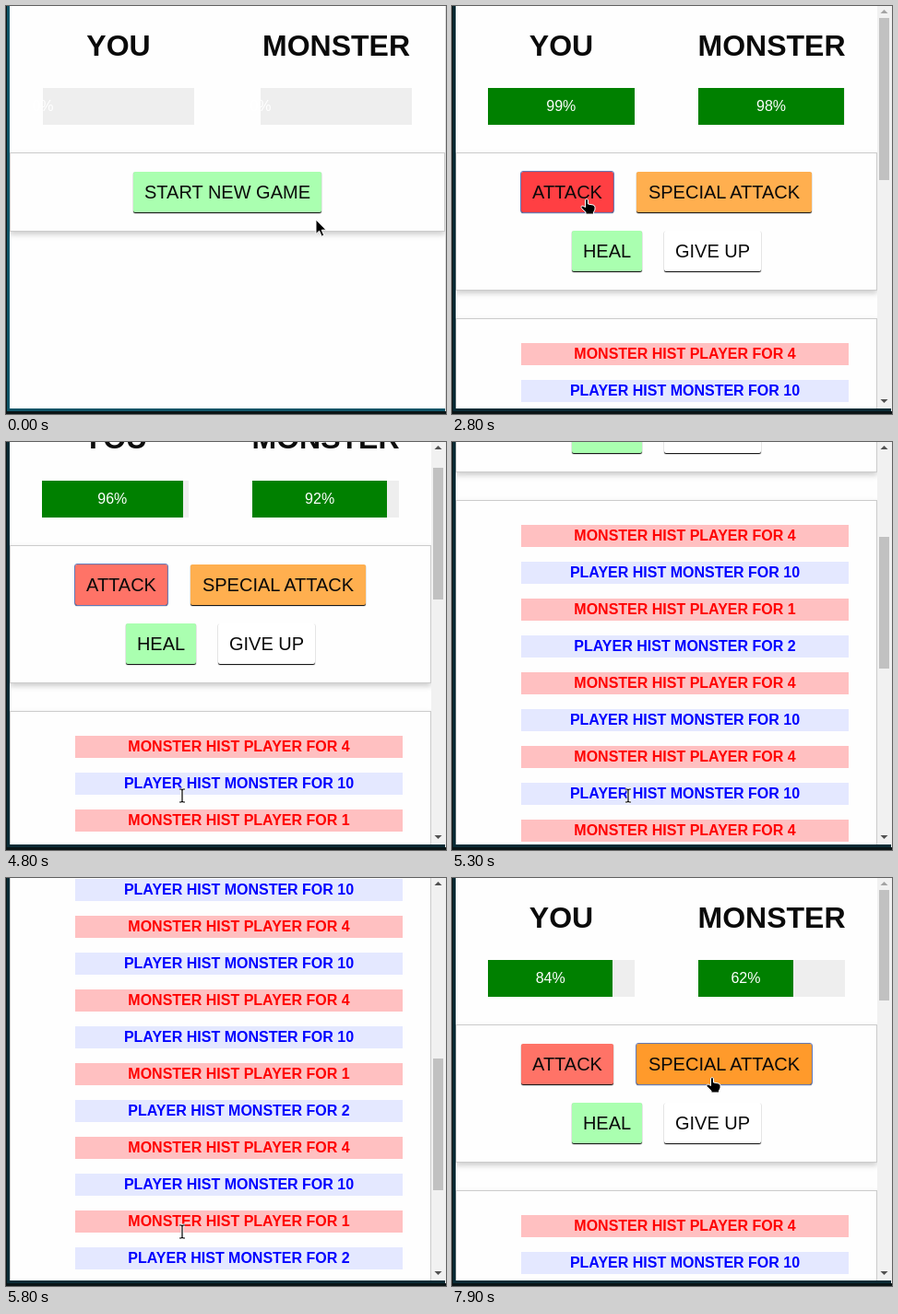
Write an HTML page that moves like this. It is 477 px wide and 443 px high and loops after 8 s.

```html
<!DOCTYPE html>
<html lang="en">
<head>
<meta charset="utf-8">
<title>Monster fight</title>
<style>
html, body { margin: 0; width: 100%; height: 100%; overflow: hidden; }
body { position: relative; background: #0a1416; color: #0a0a0a; font: 16px "Liberation Sans", Arial, sans-serif; }
div, h1, button, svg { position: absolute; box-sizing: border-box; margin: 0; white-space: nowrap; text-align: center; }
#frame { left: 1px; top: 0; width: 476px; height: 440px; background: #0f5568; border-right: 1px solid #ddd; }
.run #frame { background: #0a2c36; border-color: #eee; }
#view { left: 0; top: 0; width: 477px; height: 443px; background: #fefefe; clip-path: inset(0 1px 6px 4px); }
#doc { left: 0; top: 0; width: 477px; height: 0; }

.side { left: 4px; top: 0; width: 236px; height: 130px; }
.side + .side { left: 240px; }
.run .side { width: 229px; }
.run .side + .side { left: 232px; }
h1 { top: 23px; width: 100%; font-size: 32px; line-height: 40px; }
.bar { left: 36px; top: 89px; width: 164px; height: 40px; background: #eee; }
.run .bar { left: 35px; width: 159px; }
.fill { left: 0; top: 0; height: 100%; display: flex; justify-content: center; background: green; color: #fff; line-height: 40px; }
.fill span { flex: none; }

.panel { left: 4px; width: 472px; border: 1px solid #ccc; box-shadow: 0 3px 6px #ccc; }
.run .panel { width: 457px; }
#controls { top: 159px; height: 86px; }
.run #controls { height: 150px; }
#log { top: 339px; }
.row { left: 70px; width: 355px; height: 24px; line-height: 24px; font-weight: bold; color: red; background: #ffc0c1; }
.row.player { color: blue; background: #e4e8ff; }
button { height: 44px; padding: 0; border: 0; border-radius: 2px; font: 20px/44px "Liberation Sans", Arial, sans-serif; color: #0a0a0a; box-shadow: 0 1px 1px #000; }
button.focus { outline: 1px solid #6179b8; }

#scroll { left: 461px; top: 0; width: 15px; height: 437px; background: #f1f1f1; }
#thumb { left: 2px; width: 11px; background: #c1c1c1; }
#scroll svg { left: 0; top: 0; }
#pointer { left: 0; top: 0; overflow: visible; }
</style>
</head>
<body>
<div id="frame"></div>
<div id="view">
  <div id="doc">
    <div class="side"><h1>YOU</h1><div class="bar"><div class="fill"><span></span></div></div></div>
    <div class="side"><h1>MONSTER</h1><div class="bar"><div class="fill"><span></span></div></div></div>
    <div id="controls" class="panel"></div>
    <div id="log" class="panel"></div>
  </div>
  <div id="scroll">
    <div id="thumb"></div>
    <svg width="15" height="437"><path id="up" d="M3.5 8L7.5 4L11.5 8Z"/><path d="M3.5 427L7.5 431L11.5 427Z" fill="#505050"/></svg>
  </div>
</div>
<svg id="pointer" width="1" height="1">
  <path id="arrow" d="M0 0V15.5L3.6 12.2L6.2 18.2L8.8 17L6.2 11.2H11Z" stroke="#fff" stroke-width="1"/>
  <path id="hand" d="M-1.5 0.5Q0 -1.5 1.5 0.5V5L7 6Q9 6.500 9 8.500V11L7.500 14V16H-1V14L-5.500 9.500Q-7 7 -4 7L-1.500 8.500Z" stroke="#fff" stroke-width="1"/>
  <g id="beam" fill="none">
    <path d="M-3 -7H-1L0 -6L1 -7H3M0 -6V6M-3 7H-1L0 6L1 7H3" stroke="#fff" stroke-width="3"/>
    <path d="M-3 -7H-1L0 -6L1 -7H3M0 -6V6M-3 7H-1L0 6L1 7H3" stroke="#000" stroke-width="1.200"/>
  </g>
</svg>
<script>
const $ = id => document.getElementById(id);
const LOOP = 8000, STEP = 100, START = 500, TRACK = 409, VIEW = 439;

// Monster damage per round: earlier rounds, then the ones played here
const oldRounds = '4144414', newRounds = '1111444';
const clicks = [2800, 3000, 3800, 3800, 7200, 7400, 7800];
const playerHit = hit => hit > 1 ? 10 : 2;

// Keyframes: [time, value]
const grow = [[400, 0], [1000, 100]];
const loss = [[2700, 0], [2800, .3], [2900, .3], [3300, 2], [3700, 2], [3800, 2.9], [3900, 2.9],
  [4000, 4], [7100, 4], [7600, 12], [7700, 12], [7800, 13], [7900, 14.9]];
const scrollY = [[4700, 0], [4800, 47], [5300, 276], [5600, 815], [5700, 740], [5800, 565], [6200, 0]];
const mouseX = [[0, 336], [200, 310], [800, 310], [1300, 146], [3900, 146], [4500, 191], [6600, 191], [6700, 279], [7000, 279], [7100, 282]];
const mouseY = [[0, 232], [200, 208], [800, 208], [1300, 210], [3900, 210], [4500, 384], [6600, 384], [6700, 226], [7000, 226], [7100, 217]];

function at(keys, t) {
  const i = keys.findIndex(k => k[0] > t);
  if (i < 0) return keys[keys.length - 1][1];
  if (i === 0) return keys[0][1];
  const [t0, a] = keys[i - 1], [t1, b] = keys[i];
  return a + (b - a) * (t - t0) / (t1 - t0);
}

function add(parent, tag, text, className = '') {
  const el = document.createElement(tag);
  el.textContent = text;
  el.className = className;
  return parent.appendChild(el);
}

const buttons = [
  ['START NEW GAME', 138, 180, 204, '#aaffb0', '#76ff7e'],
  ['ATTACK', 75, 180, 100, '#ff7367', '#ff3f43'],
  ['SPECIAL ATTACK', 200, 180, 190, '#ffaf4f', '#ff9a2b'],
  ['HEAL', 130, 244, 76, '#aaffb0', '#76ff7e'],
  ['GIVE UP', 230, 244, 105, '#ffffff', '#c7c7c7']
].map(([text, x, y, w, color, hover]) => {
  const el = add($('doc'), 'button', text);
  Object.assign(el.style, { left: x + 'px', top: y + 'px', width: w + 'px' });
  return { el, x, y, w, color, hover };
});

const rows = [...oldRounds + newRounds].flatMap(hit => [
  add($('log'), 'div', 'MONSTER HIST PLAYER FOR ' + hit, 'row'),
  add($('log'), 'div', 'PLAYER HIST MONSTER FOR ' + playerHit(hit), 'row player')
]);
rows.forEach((row, i) => row.style.top = 26 + 40 * i + 'px');

const fills = document.querySelectorAll('.fill');
function setBar(i, width, label) {
  fills[i].style.width = width + '%';
  fills[i].firstChild.textContent = label + '%';
}

function show(el, on) { el.style.display = on ? '' : 'none'; }

function draw(now) {
  const t = Math.floor(now % LOOP / STEP) * STEP;
  const run = t >= START;
  document.body.className = run ? 'run' : '';

  const rounds = clicks.filter(c => c <= t).length;
  let you = run ? 100 : 0, monster = you;
  for (const hit of newRounds.slice(0, rounds)) {
    you -= hit;
    monster -= playerHit(hit);
  }
  const full = at(grow, t), lost = at(loss, t);
  setBar(0, full - lost, you);
  setBar(1, full - (lost < 4 ? 2 * lost : 8 + 2.5 * (lost - 4)), monster);

  const count = 2 * (oldRounds.length + rounds);
  rows.forEach((row, i) => show(row, i < count));
  show($('log'), run);
  $('log').style.height = 37 + 40 * count + 'px';

  const y = Math.round(at(scrollY, t)), ratio = TRACK / (380 + 40 * count);
  $('doc').style.top = -y + 'px';
  show($('scroll'), run);
  $('thumb').style.top = Math.round(13 + y * ratio) + 'px';
  $('thumb').style.height = Math.round(VIEW * ratio) + 'px';
  $('up').setAttribute('fill', y ? '#505050' : '#a3a3a3');

  const mx = Math.round(at(mouseX, t)), my = Math.round(at(mouseY, t));
  const focus = t >= 7200 ? 2 : t >= 2800 ? 1 : -1;
  let over = false;
  buttons.forEach((b, i) => {
    const shown = run === i > 0, dx = mx - b.x, dy = my + y - b.y;
    const hit = shown && dx >= 0 && dx < b.w && dy >= 0 && dy < 44;
    over = over || hit;
    show(b.el, shown);
    b.el.style.background = hit ? b.hover : b.color;
    b.el.className = i === focus ? 'focus' : '';
  });
  const kind = over ? 'hand' : run && my > 360 ? 'beam' : 'arrow';
  for (const id of ['arrow', 'hand', 'beam']) show($(id), id === kind);
  $('pointer').style.transform = `translate(${mx}px, ${my}px)`;
}

let begin;
function tick(now) {
  begin ??= now;
  draw(now - begin);
  requestAnimationFrame(tick);
}
draw(0);
requestAnimationFrame(tick);
</script>
</body>
</html>
```
